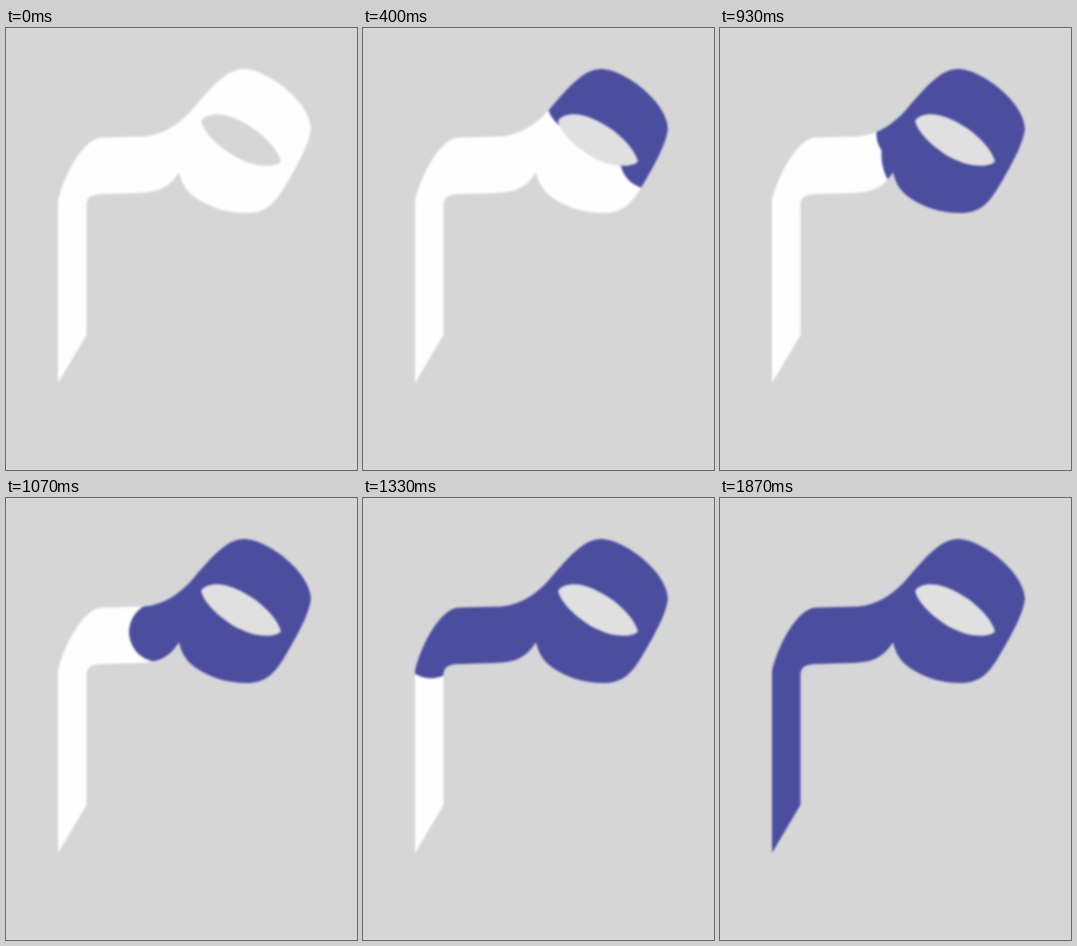
Write an HTML page with a canvas that moves like this. It is 351 by 442 pixels and loops after 4000 ms.

```html
<!DOCTYPE html>
<html lang="en">
<head>
<meta charset="utf-8">
<title>Letter painting</title>
<style>
  html, body { margin: 0; width: 100%; height: 100%; overflow: hidden; background: #d6d6d6; }
  canvas { display: block; }
</style>
</head>
<body>
<canvas id="stage" width="351" height="442"></canvas>
<script>
const stage = document.getElementById('stage');
const view = stage.getContext('2d');
const layer = document.createElement('canvas');
layer.width = stage.width;
layer.height = stage.height;
const ctx = layer.getContext('2d');

const LOOP = 4000, LAST_STEP = 28, BRUSH = 60, SOFTNESS = 1;
const GROUND = '#d6d6d6', BLANK = '#fefefe', INK = '#4b4d9f', HOLE = '#e0e0e0';

const hole = new Path2D(`M195 93 C199 85 215 84 228 90 C250 99 270 117 275 133
  C272 139 255 139 242 134.5 C220 126 199 108 195 93 Z`);

const letter = new Path2D(`M52 355 V175 C53 161 74 109 97 109.5 L138 108.5
  C158 107 174 95 185 83 C205 60 220 41 238 41 C262 41 305 75 305 101
  C303 117 290 140 278 160 C267 178 258 185 240 185
  C218 185 203 178 193 172 C180 164 176 156 173 144.5
  C163 159 155 164 132 165 L100 166 C86 166 80.5 168 80.5 178 V307 Z`);
letter.addPath(hole);

// Path of the brush centre: round the eye, along the neck, down the stem
const route = new Path2D(`M214 73 C240 58 286 74 288 118 C288 150 272 163 245 163
  C225 163 200 150 193 135 C185 115 211 85 184 108
  C172 126 160 137 130 137 H84 C72 137 66 148 66 166 V380`);

// Fifteen steps a second, timed to hundredths
function stepAt(t) {
  const ticks = Math.floor(t / 10);
  return Math.min(LAST_STEP, Math.ceil((ticks + .5) * .15) - 1);
}

// The brush speeds up gently
const brushDistance = step => step * (18.6 + .12 * step);

function paintLetter(step) {
  ctx.fillStyle = GROUND;
  ctx.fillRect(0, 0, layer.width, layer.height);
  ctx.fillStyle = BLANK;
  ctx.fill(letter, 'evenodd');
  if (step < 1) return;

  ctx.fillStyle = HOLE;
  ctx.fill(hole);
  ctx.save();
  ctx.clip(letter, 'evenodd');
  ctx.strokeStyle = INK;
  ctx.lineWidth = BRUSH;
  ctx.lineCap = ctx.lineJoin = 'round';
  ctx.setLineDash([brushDistance(step), 2000]);
  ctx.stroke(route);
  ctx.restore();
}

function draw(step) {
  paintLetter(step);
  view.filter = 'none';
  view.fillStyle = GROUND;
  view.fillRect(0, 0, stage.width, stage.height);
  view.filter = `blur(${SOFTNESS}px)`;
  view.drawImage(layer, 0, 0);
}

const start = performance.now();
function tick() {
  draw(stepAt((performance.now() - start) % LOOP));
  requestAnimationFrame(tick);
}
tick();
</script>
</body>
</html>
```
